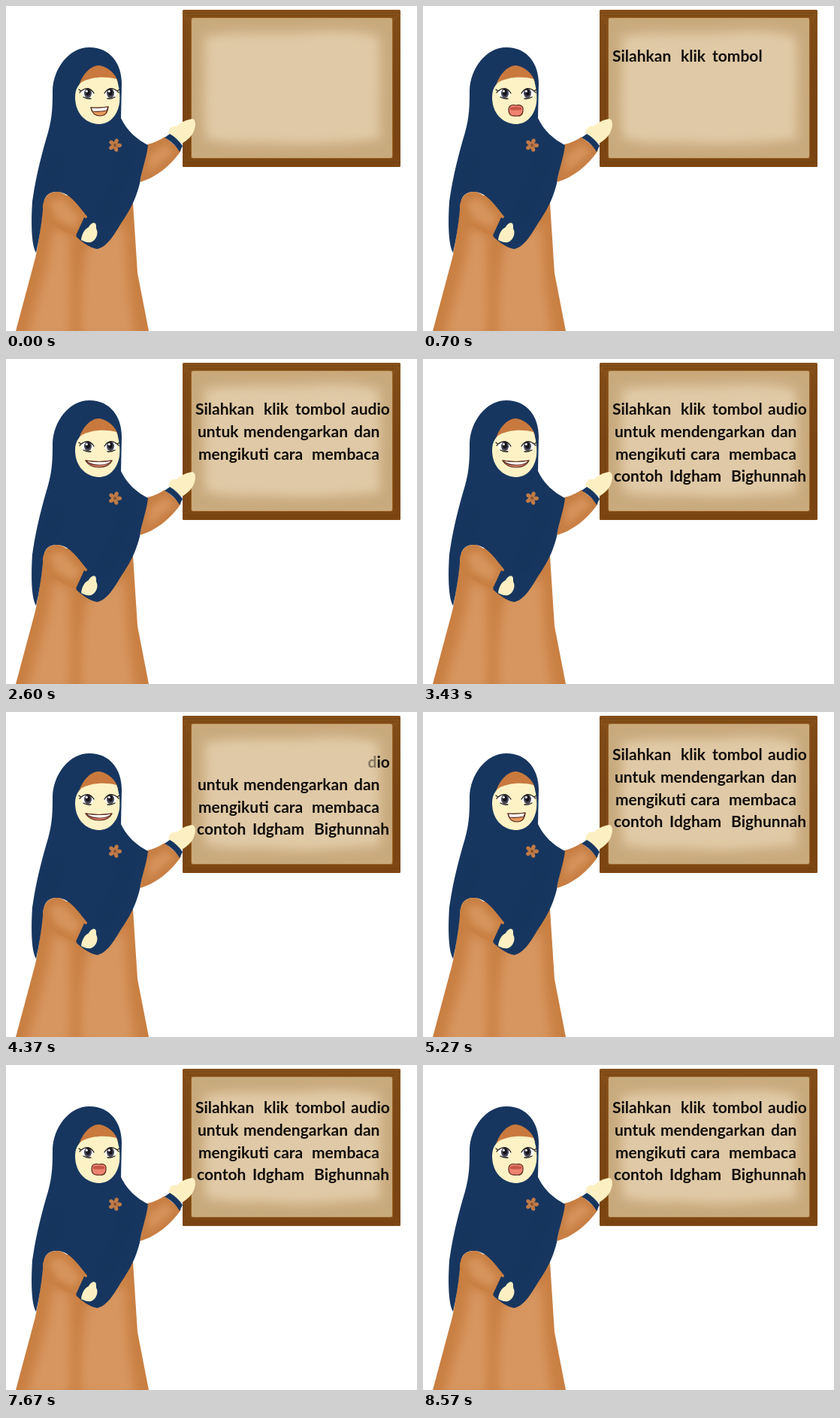
These frames come from a looping animation (547 by 432 pixels, 8.61 s). An HTML page:

```html
<!DOCTYPE html>
<html lang="id">
<head>
<meta charset="utf-8">
<style>
  html, body { margin: 0; width: 100%; height: 100%; overflow: hidden; background: #fff; }
  svg { display: block; width: 547px; height: 432px; }
  text { font: 700 21px Lato, "Open Sans", sans-serif; fill: #100d0a; }
</style>
</head>
<body>
<svg viewBox="0 0 547 432">
  <defs>
    <filter id="soft" x="-30%" y="-30%" width="160%" height="160%"><feGaussianBlur stdDeviation="7"/></filter>
    <filter id="softer" x="-30%" y="-30%" width="160%" height="160%"><feGaussianBlur stdDeviation="4"/></filter>
    <linearGradient id="wood" x2="0" y2="1">
      <stop stop-color="#85501a"/><stop offset=".5" stop-color="#7c4715"/><stop offset="1" stop-color="#7d4712"/>
    </linearGradient>
    <clipPath id="panel"><rect x="247" y="16" width="267" height="186" rx="2"/></clipPath>
    <clipPath id="gown"><path d="M50 258C47 290 43 318 39 335L13 432H190L175 355 169 262 110 246Z"/></clipPath>
    <clipPath id="leftArm"><path d="M49 268C50 252 58 246 70 247 84 250 97 268 108 280L94 306C75 300 55 288 49 268Z"/></clipPath>
    <clipPath id="rightArm"><path d="M188 184C197 182 205 178 211 174L233 192C220 212 198 229 178 234Z"/></clipPath>
  </defs>

  <g id="board">
    <rect x="235" y="5" width="290" height="209" rx="1.5" fill="url(#wood)"/>
    <path d="M236 9H524M240 13H520M236 208H524M242 211H515M238 18V203M242 24V195M518 20V200M522 14V205" stroke="#6b3a0c" stroke-width="1" opacity=".55"/>
    <rect x="246" y="15" width="269" height="188" rx="3" fill="#986023"/>
    <g clip-path="url(#panel)">
      <rect x="247" y="16" width="267" height="186" fill="#c8aa7d"/>
      <path d="M264 40C310 32 370 38 410 34 450 31 480 35 496 40 501 75 496 130 498 178 440 182 400 187 350 182 320 182 290 184 266 176 260 130 266 85 264 40Z" fill="#e0c9a6" filter="url(#soft)"/>
    </g>
  </g>

  <g id="teacher">
    <g clip-path="url(#gown)">
      <rect x="10" y="240" width="185" height="195" fill="#c97f42"/>
      <path d="M62 295C58 345 40 390 28 440H85C88 390 85 340 85 305ZM108 320C100 360 98 400 100 440H172C165 395 160 350 158 290Z" fill="#d79660" filter="url(#soft)"/>
    </g>
    <g clip-path="url(#rightArm)">
      <rect x="175" y="170" width="62" height="66" fill="#c77e43"/>
      <path d="M190 198L212 183 224 194 190 222Z" fill="#d5925a" filter="url(#softer)"/>
    </g>
    <path d="M216 169C217 162 222 158 227 160 233 154 241 151 248 150 252 151 253 157 251 163 249 172 242 178 234 183Z" fill="#fcf0c3"/>
    <path d="M211 175L218 170C225 174 231 180 235 186L231 194C226 185 219 179 211 175Z" fill="#17365f"/>

    <path d="M62 112C63 84 83 55 111 55 139 55 154 77 154 103L153 149C161 166 174 177 189 185 187 203 180 219 178 236 172 260 163 274 153 289 144 304 134 321 121 323 111 321 101 314 93 306L108 280C96 265 84 247 68 247 54 247 49 256 49 272 47 292 44 310 40 328 34 318 33 291 35 260 40 225 48 195 56 168 62 147 62 130 62 112Z" fill="#17365f"/>
    <path d="M69 200C64 223 57 232 51 242M160 190C155 225 146 249 130 276" fill="none" stroke="#102c50" stroke-width="3" opacity=".35" filter="url(#softer)"/>

    <g clip-path="url(#leftArm)">
      <rect x="45" y="242" width="68" height="68" fill="#c97f42"/>
      <path d="M58 260L75 256 99 282 90 295 66 282Z" fill="#d6945c" filter="url(#softer)"/>
    </g>
    <path d="M104 281L110 284C106 291 102 299 101 308L93 305Z" fill="#17365f"/>
    <path d="M100 311C101 303 104 297 110 294 112 290 116 287 119 289 121 292 119 295 121 298 123 304 119 312 113 314 108 315 104 313 100 311Z" fill="#fcf0c3"/>

    <path d="M97 106C101 92 112 79 124 79 136 81 146 90 149 101L147 113 99 113Z" fill="#c9793d"/>
    <path d="M92 121C92 111 96 105 101 101 114 94 132 93 147 97 151 107 152 120 151 129 148 147 137 157 123 157 106 156 92 143 92 121Z" fill="#fdf2c6"/>
    <g id="flower" fill="#c07a47"></g>
    <g id="eyes"></g>
    <g id="lids" fill="none" stroke="#25201f" stroke-width="1.8" stroke-linecap="round">
      <path d="M99 115Q108 121 117 117M131 117Q140 121 150 115M99 115L97 113M150 115L152 113"/>
    </g>
    <g id="mouths" stroke="#5a2a1d" stroke-width="1.2" stroke-linejoin="round">
      <g>
        <path d="M113 135Q124 136 136 134 135 146 125 146 115 146 113 135Z" fill="#e59a5d"/>
        <path d="M113 135Q124 136 136 134L134 139Q124 141 115 140Z" fill="#fff"/>
      </g>
      <g>
        <path d="M106 135Q124 138 141 135 137 144 124 144 111 144 106 135Z" fill="#e2846b"/>
        <path d="M106 135Q124 138 141 135 137 141 124 141 112 141 106 135Z" fill="#fff"/>
      </g>
      <g>
        <path d="M114 138C114 131 120 131 124 132 129 131 134 132 133 139 133 145 129 147 123 146 117 147 114 144 114 138Z" fill="#ee8370"/>
        <path d="M116 135Q124 133 131 135L131 138Q124 139 116 138Z" fill="#c45647" stroke="none"/>
      </g>
    </g>
  </g>
  <g id="caption"></g>
</svg>
<script>
const LOOP = 8610, STEP = LOOP / 258;
const SECOND_PAGE = 5270, REST_FROM = 5070;
const ERASE_FROM = 4140, ERASE_STEP = 9.8;
const TALK = 975, BLINK_FROM = 930;
const [OPEN, WIDE, ROUND] = [0, 1, 2];

// phase (ms) at which each mouth shape begins within a talk cycle
const speech = [[0, OPEN], [110, ROUND], [220, WIDE], [320, OPEN], [440, WIDE],
  [540, OPEN], [620, WIDE], [700, ROUND], [860, WIDE]];

// words with their left edges; start is the typing step of the line's first letter
const lines = [
  { y: 74, start: 2, words: [["Silahkan", 252], ["klik", 343], ["tombol", 385], ["audio", 459]] },
  { y: 104, start: 30, words: [["untuk", 255], ["mendengarkan", 316], ["dan", 463]] },
  { y: 133.5, start: 54, words: [["mengikuti", 256], ["cara", 356], ["membaca", 407]] },
  { y: 163, start: 80, words: [["contoh", 254], ["Idgham", 328], ["Bighunnah", 410]] }
];

const byId = id => document.getElementById(id);
function add(parent, tag, attrs = {}, content = "") {
  const node = document.createElementNS("http://www.w3.org/2000/svg", tag);
  for (const key in attrs) node.setAttribute(key, attrs[key]);
  node.textContent = content;
  return parent.appendChild(node);
}

const caption = byId("caption"), eyes = byId("eyes"), lids = byId("lids");
const mouths = [...byId("mouths").children];
const letters = [];

let order = 0;
for (const { y, start, words } of lines) {
  let column = 0;
  for (const [word, x] of words) {
    const text = add(caption, "text", { x, y });
    for (const char of word) {
      letters.push({ node: add(text, "tspan", {}, char), shownAt: (start + column) * STEP, order });
      column++;
      order++;
    }
    column++;
    order++;
  }
  order--;
}

const flower = byId("flower");
for (let i = 0; i < 5; i++) {
  add(flower, "ellipse", { cx: 145, cy: 179.8, rx: 2.7, ry: 3.9, transform: `rotate(${i * 72 + 20} 145 185)` });
}
add(flower, "circle", { cx: 145, cy: 185, r: 1.7, fill: "#8f5229" });

function drawEye(cx, side) {
  const eye = add(eyes, "g", { transform: `translate(${cx} 116) scale(${side} 1)` });
  add(eye, "path", { d: "M-8 0Q-1 -11 9 -3 9 6 1 7 -6 7 -8 0Z", fill: "#fff" });
  add(eye, "ellipse", { cx: 0, cy: 0, rx: 5, ry: 6.5, fill: "#4a4a58" });
  add(eye, "ellipse", { cx: 0, cy: -1, rx: 3, ry: 4.3, fill: "#17151d" });
  add(eye, "circle", { cx: -1.6 * side, cy: -2.8, r: 1.5, fill: "#fff" });
  add(eye, "path", { d: "M-8 0Q-1 -11 9 -3L12 -5M9 -3L11 -1M-4 7Q1 8 6 5", fill: "none",
    stroke: "#25201f", "stroke-width": 1.3, "stroke-linecap": "round" });
}
drawEye(109, -1);
drawEye(139, 1);

const clamp = value => Math.max(0, Math.min(1, value));
const show = (node, visible) => node.setAttribute("visibility", visible ? "visible" : "hidden");

function letterOpacity({ shownAt, order }, t) {
  if (t >= SECOND_PAGE) return 1;
  if (t < shownAt) return 0;
  return clamp(order + 1 - (t - ERASE_FROM) / ERASE_STEP);
}

function render(t) {
  caption.setAttribute("transform", `translate(0 ${t >= SECOND_PAGE ? -10 : 0})`);
  for (const letter of letters) letter.node.setAttribute("fill-opacity", letterOpacity(letter, t));

  const resting = t >= REST_FROM && t < SECOND_PAGE;
  const phase = (resting ? SECOND_PAGE : t) % TALK;
  const shape = speech.filter(([from]) => from <= phase).pop()[1];
  mouths.forEach((mouth, i) => show(mouth, i === shape));

  const blinking = phase >= BLINK_FROM;
  show(eyes, !blinking);
  show(lids, blinking);
}

const began = performance.now();
function tick() {
  render((performance.now() - began) % LOOP);
  requestAnimationFrame(tick);
}
tick();
</script>
</body>
</html>
```
